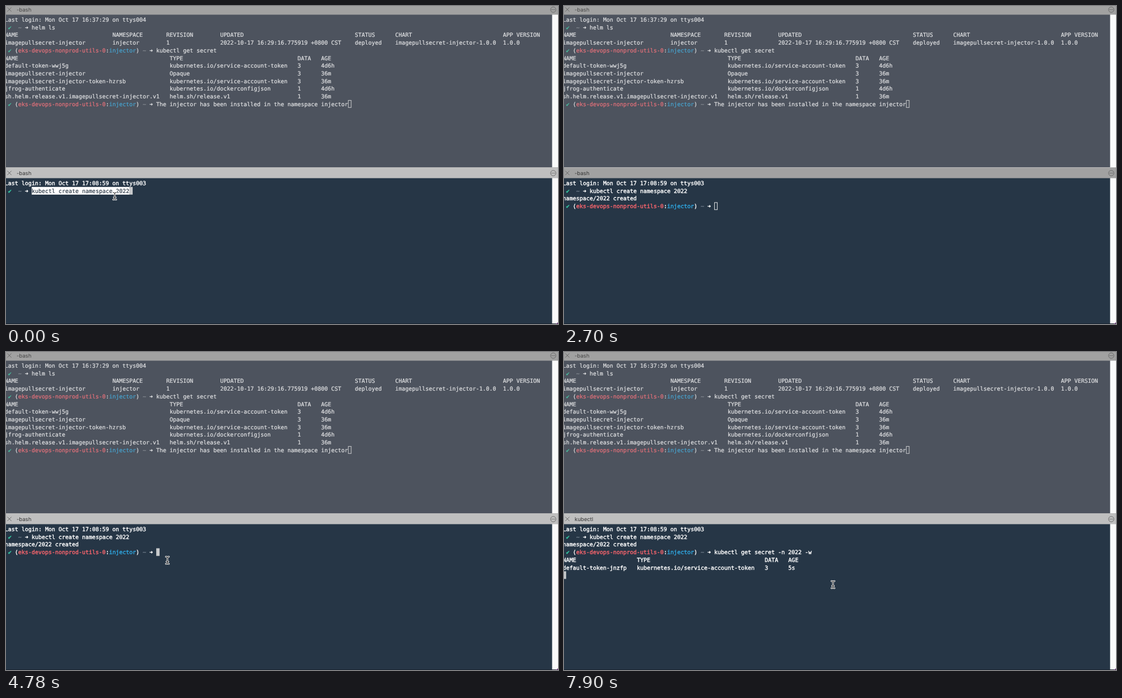
Recreate the animation shown at these times as an HTML page. Size 985x568 px, loop 8 s.

```html
<!DOCTYPE html>
<html lang="en">
<head>
<meta charset="utf-8">
<title>Terminal split</title>
<style>
  html, body { margin: 0; width: 100%; height: 100%; overflow: hidden; background: #263646; }
  svg { display: block; width: 985px; height: 568px; }
  text { white-space: pre; text-rendering: geometricPrecision; }
  .mono { font: 9.976px "DejaVu Sans Mono", monospace; }
  .title { font: 9.5px Inter, "Liberation Sans", sans-serif; }
</style>
</head>
<body>
<svg id="stage" viewBox="0 0 985 568"></svg>
<script>
const LOOP = 8000, CELL = 6.006, LINE = 13.69, LEFT = -2.2;
const stage = document.getElementById('stage');

function add(parent, tag, attrs, content) {
  const node = document.createElementNS('http://www.w3.org/2000/svg', tag);
  for (const key in attrs) node.setAttribute(key, attrs[key]);
  if (content) node.textContent = content;
  parent.append(node);
  return node;
}
const rect = (parent, x, y, width, height, fill) =>
  add(parent, 'rect', { x, y, width, height, fill });
const show = (node, on) => node.setAttribute('visibility', on ? 'inherit' : 'hidden');
const colX = col => LEFT + col * CELL;

// A pane knows its first cell top, its colours and the weight of its type.
function makePane(top, colors, weight) {
  const rowY = row => top + row * LINE;
  const put = (parent, row, col, str, color = colors.text) =>
    add(parent, 'text', {
      class: 'mono', x: colX(col), y: rowY(row) + 10.6,
      fill: color, stroke: color, 'stroke-width': weight
    }, str);
  const cells = (parent, row, cols, values) =>
    values.forEach((value, i) => put(parent, row, cols[i], value));
  function home(parent, row) {
    put(parent, row, 1, '✔', colors.check);
    put(parent, row, 4, '~', colors.dim);
    put(parent, row, 6, '➜');
  }
  function prompt(parent, row) {
    put(parent, row, 1, '✔', colors.check);
    put(parent, row, 3, '(');
    put(parent, row, 4, 'eks-devops-nonprod-utils-0', colors.red);
    put(parent, row, 30, ':');
    put(parent, row, 31, 'injector', colors.blue);
    put(parent, row, 39, ')');
    put(parent, row, 41, '~', colors.dim);
    put(parent, row, 43, '➜');
  }
  return { rowY, put, cells, home, prompt };
}

function makeHeader(y, height, cy, ink) {
  const bar = rect(stage, 0, y, 985, height, '#a1a1a1');
  add(stage, 'path', {
    d: `M2.3 ${cy - 3.7}l7.4 7.4m0 -7.4l-7.4 7.4`, stroke: '#696969', 'stroke-width': 1, fill: 'none'
  });
  const title = add(stage, 'text', { class: 'title', x: 19, y: cy + 3.3, fill: ink }, '-bash');
  add(stage, 'circle', { cx: 976.5, cy: cy + .3, r: 4.8, fill: 'none', stroke: '#626262', 'stroke-width': .9 });
  for (const dx of [-2.3, 0, 2.3])
    add(stage, 'circle', { cx: 976.5 + dx, cy: cy + .3, r: .75, fill: '#5a5a5a' });
  return { bar, title };
}

// Upper pane, always idle
rect(stage, 0, 0, 985, 288, '#4d535e');
rect(stage, 974.5, 15, 10.5, 273, '#fafafa');
makeHeader(0, 15.5, 6.2, '#454545');
const upper = makePane(17.5, {
  text: '#dfe0e2', red: '#e5717a', blue: '#47a4d0', check: '#49bd9f', dim: '#868b93'
}, .24);
const releaseCols = [0, 32, 48, 64, 104, 116, 148];
const secretCols = [0, 49, 87, 94];
const token = 'kubernetes.io/service-account-token';
const heads = ['NAME', 'TYPE', 'DATA', 'AGE'];
upper.put(stage, 0, 0, 'Last login: Mon Oct 17 16:37:29 on ttys004');
upper.home(stage, 1);
upper.put(stage, 1, 8, 'helm ls');
upper.cells(stage, 2, releaseCols,
  ['NAME', 'NAMESPACE', 'REVISION', 'UPDATED', 'STATUS', 'CHART', 'APP VERSION']);
upper.cells(stage, 3, releaseCols,
  ['imagepullsecret-injector', 'injector', '1', '2022-10-17 16:29:16.775919 +0800 CST',
    'deployed', 'imagepullsecret-injector-1.0.0', '1.0.0']);
upper.prompt(stage, 4);
upper.put(stage, 4, 45, 'kubectl get secret');
[
  heads,
  ['default-token-wwj5g', token, '3', '4d6h'],
  ['imagepullsecret-injector', 'Opaque', '3', '36m'],
  ['imagepullsecret-injector-token-hzrsb', token, '3', '36m'],
  ['jfrog-authenticate', 'kubernetes.io/dockerconfigjson', '1', '4d6h'],
  ['sh.helm.release.v1.imagepullsecret-injector.v1', 'helm.sh/release.v1', '1', '36m']
].forEach((row, i) => upper.cells(stage, 5 + i, secretCols, row));
upper.prompt(stage, 11);
upper.put(stage, 11, 45, 'The injector has been installed in the namespace injector');
add(stage, 'rect', {
  x: colX(102) + .5, y: upper.rowY(11) + .5, width: CELL - 1, height: LINE - 1,
  fill: 'none', stroke: '#cfd0d2', 'stroke-width': 1
});

// Lower pane, where the session runs
rect(stage, 0, 288, 985, 280, '#263646');
rect(stage, 974.5, 307, 10.5, 260, '#fafafa');
const header = makeHeader(288.5, 19, 298.2, '#333');
rect(stage, 0, 288, 985, 1, '#b8b8b8');
rect(stage, 0, 567, 985, 1, '#18222d');
add(stage, 'path', { d: 'M985 564.5v3.5h-5q4 -.6 5 -3.5z', fill: '#5b2a68' });

const lower = makePane(309.5, {
  text: '#ffffff', red: '#f9656d', blue: '#2fa8e2', check: '#35c6a0', dim: '#6c7a88'
}, .42);
lower.put(stage, 0, 0, 'Last login: Mon Oct 17 17:08:59 on ttys003');
lower.home(stage, 1);
const selection = rect(stage, colX(8), lower.rowY(1), 29 * CELL, LINE, '#ffffff');
const command = lower.put(stage, 1, 8, 'kubectl create namespace 2022');

// Parts that appear at a set time
const parts = [];
function part(from, build) {
  const group = add(stage, 'g', {});
  build(group);
  parts.push({ from, group });
}
part(1350, g => lower.put(g, 2, 0, 'namespace/2022 created'));
part(1500, g => lower.prompt(g, 3));
part(4930, g => lower.put(g, 3, 45, 'kubectl get secret -n 2022 -w'));
part(6420, g => {
  const cols = [0, 22, 60, 67];
  lower.cells(g, 4, cols, heads);
  lower.cells(g, 5, cols, ['default-token-jnzfp', token, '3', '5s']);
});

const caret = add(stage, 'rect', {});
// [time, row, column]
const caretSteps = [
  [0, 1, 37], [600, 2, 0], [1350, 3, 0], [1500, 3, 45],
  [4930, 3, 74], [5370, 4, 0], [6420, 6, 0]
];

// Both pointers are black shapes with a white rim.
const arrow = add(stage, 'path', {
  d: 'M.6 .4V12.4L3.4 9.9L5.3 14.3L7.5 13.4L5.6 9.1H9.4Z',
  fill: '#000', stroke: '#fff', 'stroke-width': 1.1, 'stroke-linejoin': 'round'
});
const beam = add(stage, 'g', {});
const beamPath = 'M-2.8 -6.4Q-.3 -6.6 0 -4.8Q.3 -6.6 2.8 -6.4M0 -5V5M-2.8 6.4Q-.3 6.6 0 4.8Q.3 6.6 2.8 6.4M-1.6 2.4H1.6';
for (const [stroke, width] of [['#fff', 2.8], ['#111', 1]])
  add(beam, 'path', { d: beamPath, fill: 'none', stroke, 'stroke-width': width, 'stroke-linecap': 'round' });

// [time, shape, x, y]
const pointerSteps = [
  [0, 'beam', 194, 339.5], [1350, 'none', 0, 0],
  [3900, 'arrow', 179, 389], [4050, 'arrow', 231, 386],
  [4190, 'beam', 233, 387], [4340, 'beam', 277, 375],
  [4490, 'beam', 282, 374], [4640, 'beam', 283, 373], [4780, 'beam', 288, 372],
  [7010, 'beam', 304, 373], [7160, 'beam', 321, 379], [7310, 'beam', 347, 389],
  [7460, 'beam', 366, 392], [7600, 'beam', 377, 394], [7750, 'beam', 414, 400],
  [7900, 'beam', 480, 415.5]
];
const latest = (steps, t) => steps.findLast(step => step[0] <= t);

function draw(t) {
  const focused = t < 2700 || t >= 4190;
  header.bar.setAttribute('fill', focused ? '#bfbfbf' : '#a1a1a1');
  header.title.textContent = t < 6270 ? '-bash' : 'kubectl';

  const selected = t < 600;
  show(selection, selected);
  const ink = selected ? '#1c2a38' : '#ffffff';
  command.setAttribute('fill', ink);
  command.setAttribute('stroke', ink);
  command.setAttribute('stroke-width', selected ? .1 : .42);

  for (const { from, group } of parts) show(group, t >= from);

  const [, row, col] = latest(caretSteps, t);
  const inset = focused ? 0 : .5;
  const box = {
    x: colX(col) + inset, y: lower.rowY(row) + inset,
    width: CELL - 2 * inset, height: LINE - 2 * inset,
    fill: focused ? '#c7c9cb' : 'none', stroke: focused ? 'none' : '#e3e5e7'
  };
  for (const key in box) caret.setAttribute(key, box[key]);

  const [, shape, x, y] = latest(pointerSteps, t);
  show(arrow, shape === 'arrow');
  show(beam, shape === 'beam');
  for (const node of [arrow, beam]) node.setAttribute('transform', `translate(${x} ${y})`);
}

const start = performance.now();
function tick(now) {
  draw(Math.max(0, now - start) % LOOP);
  requestAnimationFrame(tick);
}
draw(0);
requestAnimationFrame(tick);
</script>
</body>
</html>
```
